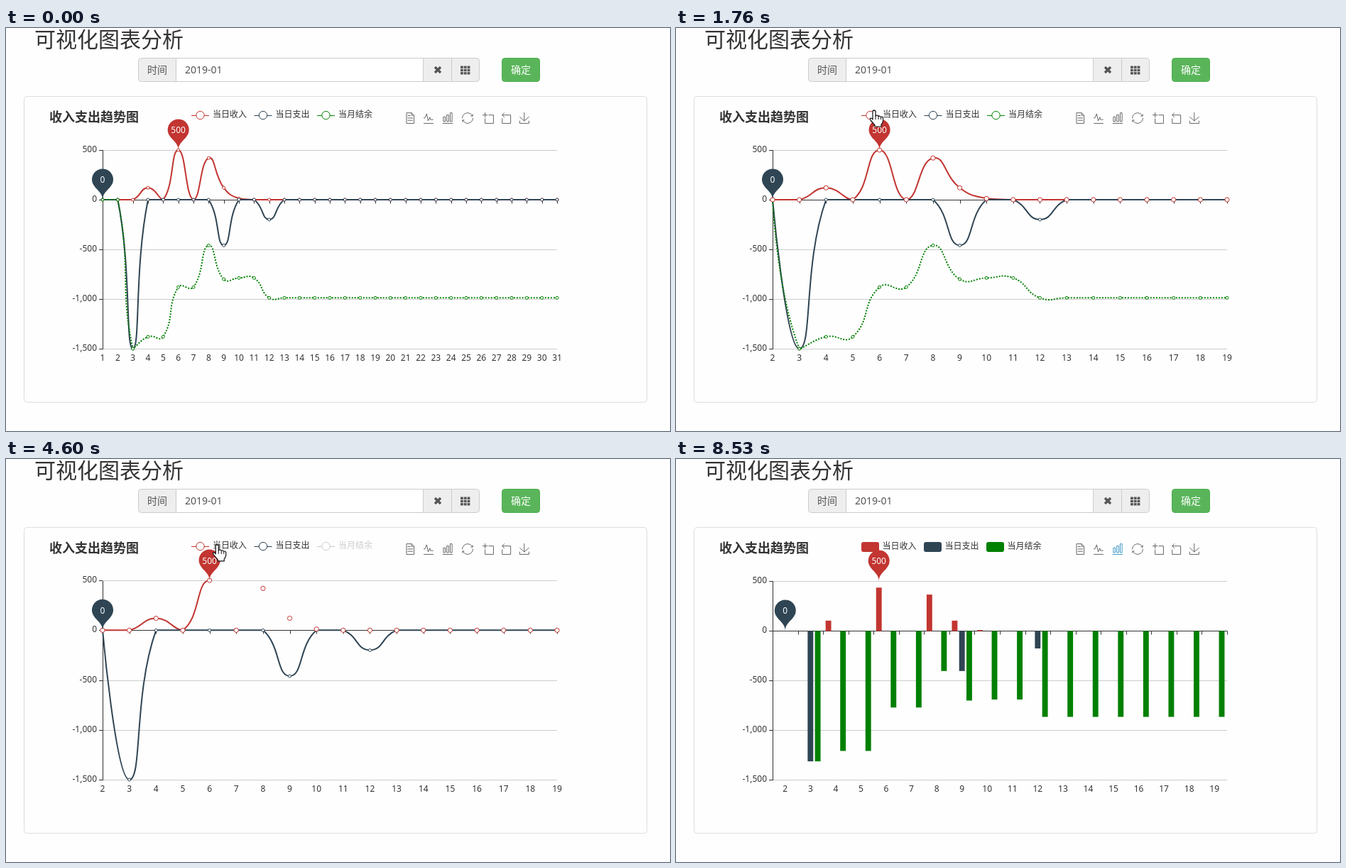
An HTML page with a canvas for the animation above (8610 ms loop, 935 by 568 pixels).

```html
<!DOCTYPE html>
<html lang="zh-CN">
<head>
<meta charset="utf-8">
<style>
html, body { margin: 0; width: 100%; height: 100%; overflow: hidden; background: #fefefe; }
canvas { display: block; }
</style>
</head>
<body>
<canvas id="stage" width="935" height="568"></canvas>
<script>
const ctx = document.getElementById('stage').getContext('2d');
const FONT = '"Noto Sans", "Noto Sans CJK SC", "Noto Sans CJK", sans-serif';
const LOOP = 8610, BAR_TIME = 7730;
const LEFT = 136, RIGHT = 776, TOP = 172, BOTTOM = 452;

// Daily income and expense, and the running balance of the month
const days = Array.from({ length: 31 }, (_, i) => i + 1);
const incomeOn = { 4: 120, 6: 500, 8: 420, 9: 120, 10: 12 };
const expenseOn = { 3: -1500, 9: -460, 12: -200 };
const income = days.map(d => incomeOn[d] || 0);
const expense = days.map(d => expenseOn[d] || 0);
let total = 0;
const balance = days.map((d, i) => total += income[i] + expense[i]);

const series = [
  { name: '当日收入', color: '#c23531', data: income, off: 2250, on: 4370, peak: 6 },
  { name: '当日支出', color: '#2f4554', data: expense, off: 5290, on: 6590, peak: 0 },
  { name: '当月结余', color: '#008000', data: balance, off: 3400, on: 5990, dash: [2, 2] }
];
const legendX = [261, 349.5, 438];

// Value axis: start time, min, max, step
const valueAxes = [
  [-1e4, -1500, 500, 500], [2250, -1500, 0, 300], [4370, -1500, 500, 500],
  [5290, 0, 500, 100], [5990, -1500, 500, 500]
];
const seriesLo = [[1000, 1], [1200, 2]];
const seriesHi = [[820, 31], [1060, 27.5], [1230, 23.8], [1380, 22], [1480, 22], [1720, 19]];
const labelLo = [[1080, 1], [1230, 1.55], [1380, 2]];
const labelHi = [[840, 31], [1070, 29], [1230, 25.5], [1400, 22], [1500, 22], [1740, 19]];
const cursorX = [[210, 830], [900, 187], [1300, 187], [1700, 279], [2400, 279], [2750, 370], [3300, 485],
  [3880, 485], [4140, 279], [4500, 279], [4960, 362], [5290, 362], [5600, 449], [6150, 451],
  [6500, 362], [6700, 362], [7300, 624], [7800, 624], [8480, 908]];
const cursorY = [[210, 462], [900, 293], [1300, 293], [1700, 116], [2400, 116], [2750, 104], [3300, 123],
  [3880, 123], [4140, 120], [5290, 122], [5600, 126], [6150, 121], [6700, 122], [7300, 132], [7800, 132], [8480, 558]];

const icons = [
  [569, 'M17 17H33M45 29.5H17M45 42H17M11 2V58H51V15L38 2ZM38 2V15H51'],
  [595, 'M4 29h7l9-22 8 38 9-20 3 13h15M4 58h52'],
  [622, 'M7 23h10v25h-10zM25 13h10v35h-10zM43 2h10v46h-10zM3 58h54'],
  [650, 'M47 19h10V9M56 20A28 28 0 0 0 2 31M13 41H3v10M4 40A28 28 0 0 0 58 29'],
  [679, 'M0 13.5h27M13.5 27V0M32 13.5H58V58H13.5V32'],
  [704, 'M22 1L10 13.5l12 12.5M10 13.5H55v44.5H10v-26'],
  [730, 'M5 23L29 45 55 23M5 44V58H54V44M29 45V0']
].map(([x, d]) => [x, new Path2D(d)]);
const arrow = new Path2D('M0 0V16L4 12.5 6.7 18.5 9.2 17.4 6.6 11.5H11.5Z');
const hand = new Path2D('M-2 1Q0-1 2 1V8Q4 6 6 8.5 8 7.5 9.5 9.5 12 8.5 12.5 11V15Q12 18 10 20V23H1V21' +
  'L-5 14Q-7 10-3 11.5L-2 13Z');

const clamp = (v, a, b) => Math.min(Math.max(v, a), b);
const mix = (a, b, p) => a + (b - a) * p;
const easeOut = p => 1 - (1 - p) ** 3;
const easeInOut = p => p < .5 ? 4 * p ** 3 : 1 - 4 * (1 - p) ** 3;
const crisp = v => Math.round(v) + .5;

function along(keys, t) {
  const n = keys.findIndex(k => k[0] > t);
  if (n === 0) return keys[0][1];
  if (n < 0) return keys[keys.length - 1][1];
  const [a, b] = [keys[n - 1], keys[n]];
  return mix(a[1], b[1], (t - a[0]) / (b[0] - a[0]));
}

function text(s, x, y, size = 12, color = '#333', align = 'left', weight = 'normal') {
  ctx.font = `${weight} ${size}px ${FONT}`;
  ctx.fillStyle = color;
  ctx.textAlign = align;
  ctx.fillText(s, x, y);
}

function line(x1, y1, x2, y2, color, width = 1) {
  ctx.beginPath();
  ctx.moveTo(x1, y1);
  ctx.lineTo(x2, y2);
  ctx.strokeStyle = color;
  ctx.lineWidth = width;
  ctx.stroke();
}

function box(x, y, w, h, radius, fill, stroke) {
  ctx.beginPath();
  ctx.roundRect(x, y, w, h, radius);
  ctx.fillStyle = fill;
  ctx.fill();
  if (!stroke) return;
  ctx.strokeStyle = stroke;
  ctx.lineWidth = 1;
  ctx.stroke();
}

function ring(x, y, r, color) {
  ctx.beginPath();
  ctx.arc(x, y, r, 0, 7);
  ctx.fillStyle = '#fff';
  ctx.fill();
  ctx.strokeStyle = color;
  ctx.lineWidth = 1;
  ctx.stroke();
}

function drawPage() {
  ctx.fillStyle = '#fefefe';
  ctx.fillRect(0, 0, 935, 568);
  text('可视化图表分析', 40, 26.5, 30);
  box(186.5, 42.5, 480, 33, 4, '#eee', '#ccc');
  box(239.5, 42.5, 348, 33, 0, '#fff', '#ccc');
  line(627.5, 43, 627.5, 75, '#ccc');
  text('时间', 199, 64, 14, '#555');
  text('2019-01', 252, 64, 14, '#555');
  line(604, 55, 612, 63, '#555', 3.4);
  line(612, 55, 604, 63, '#555', 3.4);
  for (let i = 0; i < 9; i++) ctx.fillRect(640 + i % 3 * 4.8, 53.5 + Math.floor(i / 3) * 4.3, 3.8, 3.4);
  box(698.5, 42.5, 53, 33, 4, '#5ab55a', '#4cae4c');
  text('确定', 711, 64, 14, '#fff');
  box(25.5, 96.5, 877, 431, 4, '#fff0', '#ddd');
  text('收入支出趋势图', 61, 131.5, 18, '#333', 'left', 'bold');
}

function drawLegend(t) {
  series.forEach((s, i) => {
    const on = isOn(s, t), color = on ? s.color : '#ccc';
    let x = legendX[i];
    if (t >= BAR_TIME) {
      x = 261 + i * 88;
      box(x, 117, 25, 14, 3, color);
      text(s.name, x + 29.5, 127);
    } else {
      line(x, 123.5, x + 25, 123.5, color);
      ring(x + 12.5, 123, 5.7, color);
      text(s.name, x + 30, 126, 12, on ? '#333' : '#ccc');
    }
  });
}

function drawToolbox(t, barHover) {
  const scale = .265;
  icons.forEach(([x, path], i) => {
    ctx.save();
    ctx.translate(x - 30 * scale, 127 - 30 * scale);
    ctx.scale(scale, scale);
    ctx.lineWidth = 1 / scale;
    ctx.strokeStyle = i === 2 && (barHover || t >= BAR_TIME) ? '#3e98c5' : '#666';
    ctx.stroke(path);
    ctx.restore();
  });
  if (barHover) text('切换为柱状图', 622, 150.5, 12, '#3e98c5', 'center');
}

const isOn = (s, t) => t < s.off || t >= s.on;

function axisScale(lo, hi, band) {
  const step = (RIGHT - LEFT) / (hi - lo + band);
  return { step, at: d => LEFT + (d - lo + band / 2) * step };
}

function smoothCurve(points) {
  const xs = points.map(p => p[0]), ys = points.map(p => p[1]);
  const x0 = Math.min(...xs), x1 = Math.max(...xs), y0 = Math.min(...ys), y1 = Math.max(...ys);
  const inside = (x, y) => [clamp(x, x0, x1), clamp(y, y0, y1)];
  let out = points[0];
  ctx.beginPath();
  ctx.moveTo(...out);
  for (let i = 1; i < points.length; i++) {
    const p = points[i], a = points[i - 1], b = points[i + 1];
    let into = p, next = p;
    if (b) {
      const before = Math.hypot(p[0] - a[0], p[1] - a[1]), after = Math.hypot(b[0] - p[0], b[1] - p[1]);
      const vx = (b[0] - a[0]) / 2, vy = (b[1] - a[1]) / 2, share = after / (before + after);
      into = inside(p[0] - vx * (1 - share), p[1] - vy * (1 - share));
      next = inside(p[0] + vx * share, p[1] + vy * share);
    }
    ctx.bezierCurveTo(...out, ...into, ...p);
    out = next;
  }
}

function drawPin(x, y, color, label) {
  const r = 15, dy = r * r / 35, cy = y - 35 + dy, angle = Math.asin(dy / r);
  const side = Math.cos(angle) * r - Math.sin(angle) * 9, low = cy + dy + Math.cos(angle) * 9;
  ctx.beginPath();
  ctx.arc(x, cy, r, Math.PI - angle, 2 * Math.PI + angle);
  ctx.bezierCurveTo(x + side, low, x, y - 10.5, x, y);
  ctx.bezierCurveTo(x, y - 10.5, x - side, low, x - Math.cos(angle) * r, cy + dy);
  ctx.fillStyle = color;
  ctx.fill();
  text(label, x, cy + 5, 12, '#fff', 'center');
}

function drawChart(t, hovered, cx, cy) {
  const barMode = t >= BAR_TIME;
  const band = barMode ? easeOut(clamp((t - BAR_TIME) / 300, 0, 1)) : 0;
  const lo = along(seriesLo, t), hi = along(seriesHi, t);
  const X = axisScale(lo, hi, barMode ? 1 : 0);
  const labels = axisScale(along(labelLo, t), along(labelHi, t), band);

  const n = valueAxes.filter(a => a[0] <= t).length - 1;
  const now = valueAxes[n], last = valueAxes[Math.max(n - 1, 0)];
  const p = easeOut(clamp((t - now[0]) / 300, 0, 1));
  const min = mix(last[1], now[1], p), max = mix(last[2], now[2], p);
  const Y = v => BOTTOM - (v - min) / (max - min) * (BOTTOM - TOP);

  for (let v = now[1]; v <= now[2]; v += now[3]) {
    const y = crisp(Y(v));
    if (y < TOP - 1 || y > BOTTOM + 1) continue;
    line(LEFT, y, RIGHT, y, '#ccc');
    line(LEFT - 5, y, LEFT, y, '#333');
    text(v.toLocaleString('en-US'), 128, y + 2.5, 12, '#333', 'right');
  }
  const zero = crisp(Y(0));
  line(LEFT + .5, TOP, LEFT + .5, BOTTOM + 1, '#333');
  line(LEFT, zero, RIGHT, zero, '#333');

  const first = t < 1150 ? 1 : 2, end = t < 1150 ? 31 : t < 1500 ? 22 : 19;
  for (let d = first; d <= end; d++) {
    const x = labels.at(d), tick = x + band * labels.step / 2;
    if (x > RIGHT + 1) continue;
    if (tick < RIGHT + 1) line(crisp(tick), zero, crisp(tick), zero + 5, '#333');
    text(d, x, 469, 12, '#333', 'center');
  }

  // Pointer line snaps to a category
  if (t > 210 && cx > LEFT && cx < RIGHT && cy > TOP && cy < BOTTOM) {
    const step = 640 / (t < 850 ? 30 : t < 1100 ? 27 : t < 1450 ? 20 : 17);
    const x = crisp(LEFT + Math.floor((cx - LEFT) / step) * step);
    line(x, TOP, x, BOTTOM, '#aaa');
  }

  if (barMode) {
    const grow = easeInOut(clamp((t - BAR_TIME) / 1170, 0, 1)), width = X.step * .8 / 3.6;
    series.forEach((s, i) => {
      ctx.fillStyle = s.color;
      for (let d = 2; d <= 19; d++) {
        const v = s.data[d - 1] * grow;
        ctx.fillRect(X.at(d) - X.step * .4 + i * width * 1.3, Y(0) + .5, width, Y(v) - Y(0));
      }
    });
  } else {
    const shown = days.slice(Math.floor(lo) - 1, Math.ceil(hi));
    const place = s => shown.map(d => [X.at(d), Y(s.data[d - 1])]);
    for (const s of series.filter(s => isOn(s, t))) {
      const reveal = t >= s.on ? clamp((t - s.on) / 1000, 0, 1) : 1;
      ctx.save();
      ctx.beginPath();
      ctx.rect(LEFT - 1, TOP - 2, (RIGHT - LEFT + 2) * reveal, BOTTOM - TOP + 4);
      ctx.clip();
      smoothCurve(place(s));
      ctx.setLineDash(s.dash || []);
      ctx.strokeStyle = s.color;
      ctx.lineWidth = 2;
      ctx.stroke();
      ctx.restore();
    }
    const order = series.filter(s => s !== hovered).concat(hovered || []);
    for (const s of order) {
      const on = isOn(s, t), fade = on ? 1 : 1 - (t - s.off) / 300;
      if (fade <= 0) continue;
      ctx.globalAlpha = fade;
      for (const [x, y] of place(s)) {
        if (x < LEFT - 1 || x > RIGHT + 1 || y > BOTTOM + 2 || y < TOP - 2) continue;
        ring(x, y, !on || s === hovered ? 3.1 : 2, s.color);
      }
      ctx.globalAlpha = 1;
    }
  }

  series.forEach((s, i) => {
    if (s.peak === undefined || !isOn(s, t)) return;
    const d = s.peak || Math.max(lo, 1), v = s.peak ? s.data[d - 1] : 0;
    drawPin(X.at(d) - (barMode && i === 0 ? X.step * .29 : 0), Y(v), s.color, v);
  });
}

function drawCursor(t, x, y, pointing) {
  if (t < 210 || t >= 8500) return;
  ctx.save();
  ctx.translate(x, y);
  ctx.fillStyle = '#fff';
  ctx.fill(pointing ? hand : arrow);
  ctx.strokeStyle = '#111';
  ctx.lineWidth = 1.2;
  ctx.lineJoin = 'round';
  ctx.stroke(pointing ? hand : arrow);
  if (pointing) {
    line(2, 8, 2, 13, '#111');
    line(6, 9, 6, 13, '#111');
    line(9.5, 10, 9.5, 13, '#111');
  }
  ctx.restore();
}

function draw(t) {
  const x = along(cursorX, t), y = along(cursorY, t);
  const overLegend = y > 112 && y < 132 ? legendX.findIndex(l => x >= l && x < l + 79) : -1;
  const overTools = y > 117 && y < 136 && x > 560 && x < 739;
  const target = series[overLegend];
  const hovered = target && isOn(target, t) ? target : null;
  drawPage();
  drawLegend(t);
  drawToolbox(t, overTools && Math.abs(x - 622) < 9);
  drawChart(t, hovered, x, y);
  drawCursor(t, x, y, overLegend >= 0 || overTools);
}

function frame() {
  draw(performance.now() % LOOP);
  requestAnimationFrame(frame);
}
frame();
</script>
</body>
</html>
```
